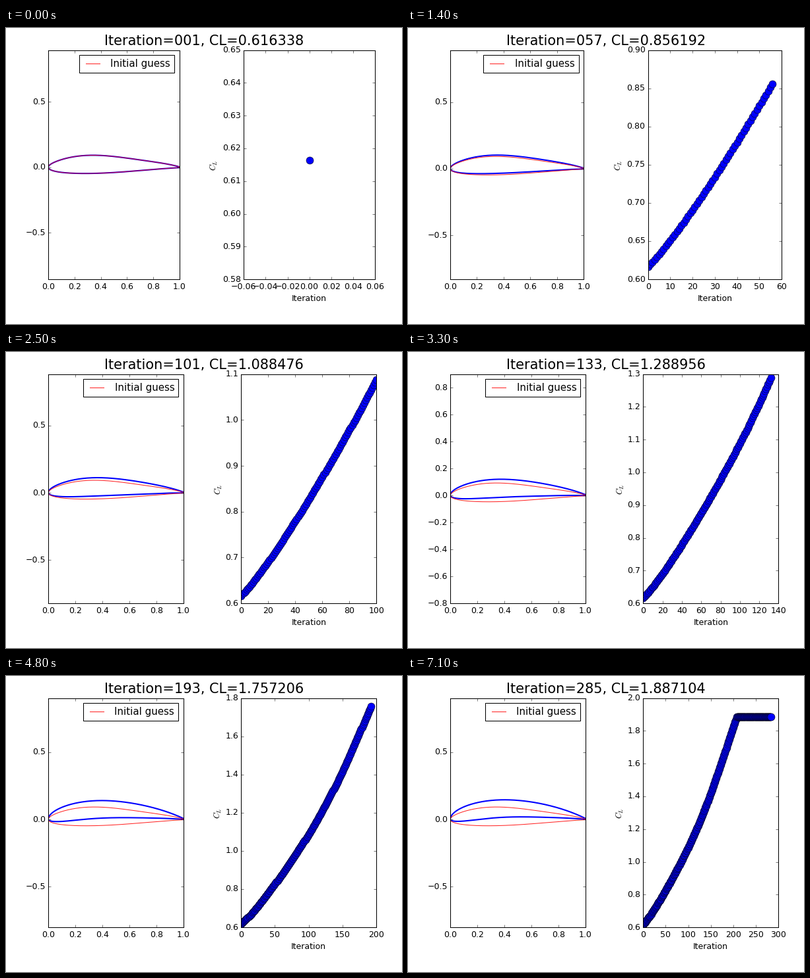
A matplotlib script for the animation above (7200 ms loop, 600x450 px).

```python
import math

import numpy as np
import matplotlib.pyplot as plt
from matplotlib.animation import FuncAnimation

plt.style.use("classic")
plt.rcParams.update({
    "font.sans-serif": ["DejaVu Sans"],
    "figure.facecolor": "white",
    "figure.dpi": 75,
    "savefig.dpi": "figure",
    "xtick.major.pad": 5,
})

WIDTH, HEIGHT = 600, 450
FRAMES, INTERVAL = 72, 100
STRIDE = 4                      # iterations per frame
LEFT, BOTTOM = 64, 382.05       # corner of the left panel, y downwards
LAST_GAIN = 208                 # the lift stays constant from here on

# The lift climbs along a smooth curve through a few key values.
key_steps = np.array([0, 36, 76, 132, 164, LAST_GAIN])
key_lifts = [.616338, .761066, .957324, 1.288956, 1.526715, 1.887104]
climb = np.polyfit(key_steps / LAST_GAIN, key_lifts, 5)
steps_done = np.arange(STRIDE * FRAMES)
lift = np.polyval(climb, np.minimum(steps_done / LAST_GAIN, 1))

root = np.linspace(0, 1, 161)   # square root of x, dense at the nose
chord = np.concatenate([root[::-1] ** 2, root ** 2])


def surface(heights, tail):
    """Round nose, thin tail, passing through heights at five stations."""
    def base(x):
        return np.sqrt(x) * (1 - x)
    x = root ** 2
    stations = np.array([.04, .2, .4, .65, .88])
    shape = np.polyfit(stations, (heights - tail * stations) / base(stations), 4)
    return base(x) * np.polyval(shape, x) + tail * x


def outline(top, low):
    """Heights along the chord, from the tail over the nose and back."""
    return np.concatenate([top[::-1], low])


start = outline(surface([.036, .082, .0912, .064, .03], .004),
                surface([-.027, -.0455, -.0445, -.0285, -.0098], -.002))
end = outline(surface([.06, .125, .146, .1215, .059], .008),
              surface([-.0135, -.001, .0165, .0175, .0095], 0))


def nice_ticks(lo, hi, bins=9):
    """Round tick values that enclose lo..hi, and their step."""
    raw = (hi - lo) / bins
    scale = 10 ** math.floor(math.log10(raw))
    for factor in (1, 2, 5, 10):
        if factor < raw / scale:
            continue
        step = factor * scale
        base = step * math.floor(lo / step)
        if base + step * bins >= hi:
            break
    spare = math.floor((base + step * bins - hi) / step)
    return base + step * np.arange(bins - spare + 1), step


def round_limits(values):
    lo, hi = float(np.min(values)), float(np.max(values))
    if lo == hi:
        pad = .05 * abs(lo) or .05
        lo, hi = lo - pad, hi + pad
    ticks, _ = nice_ticks(lo, hi)
    return float(ticks[0]), float(ticks[-1])


def visible_ticks(lo, hi):
    """Ticks inside the view, their labels and the number of decimals."""
    ticks, step = nice_ticks(lo, hi)
    slack = (hi - lo) * .0014
    ticks = ticks[(ticks > lo - slack) & (ticks < hi + slack)]
    places = max(0, -math.floor(math.log10(step) + 1e-9))
    labels = [f"{round(t, 9) + 0:.{places}f}".replace("-", "\u2212")
              for t in ticks]
    return np.clip(ticks, lo, hi), labels, places


def place(ax, x, top, width):
    ax.set_position([x / WIDTH, 1 - BOTTOM / HEIGHT,
                     width / WIDTH, (BOTTOM - top) / HEIGHT])


def label_width(text):
    dots = text.count(".")
    return 9.8 * (len(text) - dots) + 4 * dots - .8 * text.startswith("1")


fig = plt.figure(figsize=(8, 6), dpi=75)
foil_ax = fig.add_axes([.1, .15, .3, .7])
lift_ax = fig.add_axes([.6, .15, .3, .7])

foil, = foil_ax.plot(chord, start, "b", lw=2)
foil_ax.plot(chord, start, "r", lw=1, alpha=.85, label="Initial guess")
foil_ax.legend(loc="upper right")
foil_ax.set_xticks(np.linspace(0, 1, 6))
foil_ax.set_xlim(0, 1)

dots, = lift_ax.plot([], [], "bo", ms=10.6)
title = fig.suptitle("", fontsize=20, y=.978)
x_name = fig.text(0, 1 - 415 / HEIGHT, "Iteration", ha="center")
y_name = fig.text(0, 0, "$C_L$", rotation=90, ha="center", va="center")


def update(frame):
    last = STRIDE * frame
    done, history = steps_done[:last + 1], lift[:last + 1]

    xlim, ylim = round_limits(done), round_limits(history)
    x_ticks, x_labels, _ = visible_ticks(*xlim)
    y_ticks, y_labels, places = visible_ticks(*ylim)

    # The panels give way to the tick labels around them.
    at_top = y_ticks[-1] > ylim[1] - .001 * (ylim[1] - ylim[0])
    top = 33.7 if at_top else 24.9
    right = 575.7 - label_width(x_labels[-1]) / 2
    extra = 10 * (places - 1)
    width = (right - LEFT - 87.5 - extra) / 2
    x0 = right - width

    place(lift_ax, x0, top, width)
    lift_ax.set_xticks(x_ticks, x_labels)
    lift_ax.set_yticks(y_ticks, y_labels)
    lift_ax.set_xlim(xlim)
    lift_ax.set_ylim(ylim)
    dots.set_data(done, history)
    x_name.set_x((x0 + width / 2) / WIDTH)
    y_name.set_position(((x0 - 35 - extra) / WIDTH,
                         1 - ((top + BOTTOM) / 2 + 1) / HEIGHT))

    # Equal scales: the height follows from the panel's proportions.
    share = (lift[last] - lift[0]) / (lift[-1] - lift[0])
    shape = start + share * (end - start)
    foil.set_ydata(shape)
    middle = sum(round_limits([shape, start])) / 2
    half = (BOTTOM - top) / width / 2
    view = middle - half, middle + half
    ticks, labels, _ = visible_ticks(*view)
    place(foil_ax, LEFT, top, width)
    foil_ax.set_yticks(ticks, labels)
    foil_ax.set_ylim(view)

    title.set_text(f"Iteration={last + 1:03d}, CL={lift[last]:.6f}")
    return foil, dots, title, x_name, y_name


anim = FuncAnimation(fig, update, frames=FRAMES, interval=INTERVAL,
                     init_func=lambda: update(0), repeat=True, blit=False)
plt.show()
```
